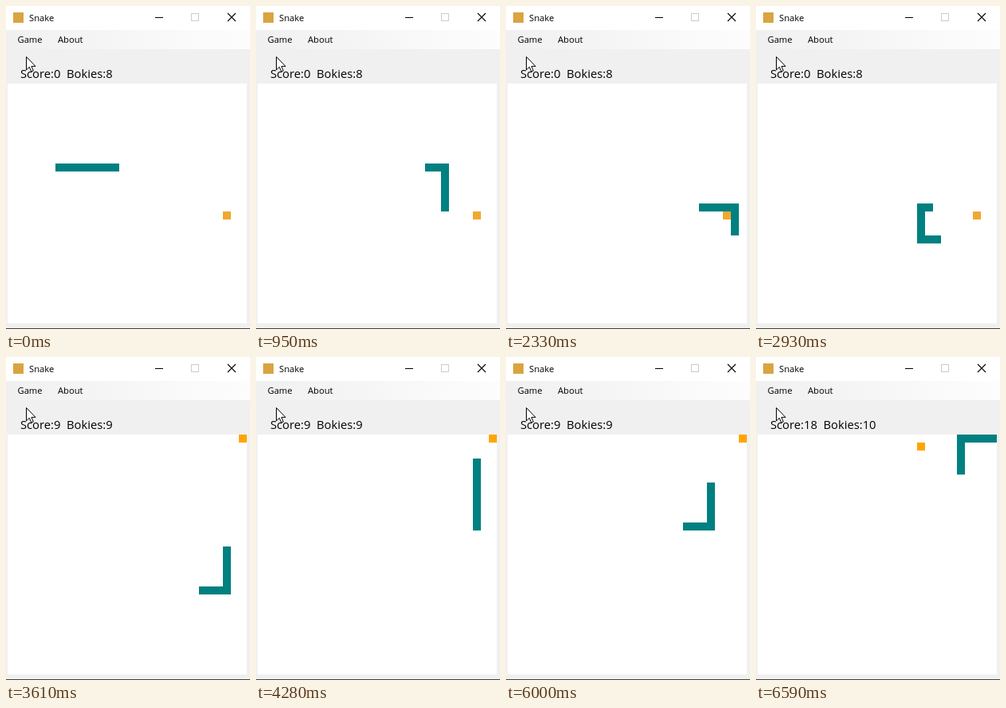
Write an HTML page that moves like this. It is 306 px wide and 404 px high and loops after 9.7 s.

```html
<!DOCTYPE html>
<html lang="en">
<head>
<meta charset="utf-8">
<title>Snake</title>
<style>
html, body { margin: 0; width: 100%; height: 100%; overflow: hidden; background: #f0f0f0; }
svg { display: block; font: 11.2px "Open Sans", sans-serif; }
</style>
</head>
<body>
<svg width="306" height="404" viewBox="0 0 306 404">
  <defs>
    <linearGradient id="strip">
      <stop offset="0" stop-color="#f0f0f0"/>
      <stop offset="1" stop-color="#fdfdfd"/>
    </linearGradient>
  </defs>

  <!-- title bar and menu -->
  <rect width="306" height="30" fill="#fff"/>
  <rect x="9" y="8" width="13" height="13" fill="#d9a441"/>
  <text x="29" y="19">Snake</text>
  <path d="M187 14.5h10" stroke="#000"/>
  <rect x="232.5" y="9.5" width="9" height="9" fill="none" stroke="#ccc"/>
  <path d="M278 9l10 10M288 9l-10 10" stroke="#000" stroke-width="1.1"/>
  <rect y="30" width="306" height="24" fill="url(#strip)"/>
  <text x="14.5" y="46">Game</text>
  <text x="65" y="46">About</text>

  <!-- board -->
  <text id="status" x="18" y="90" font-size="14.75"></text>
  <rect x="2" y="97" width="300" height="300" fill="#fff"/>
  <g transform="translate(2 97)" shape-rendering="crispEdges">
    <path id="food"/>
    <path id="snake" fill="#008080"/>
  </g>
  <rect y="403" width="306" height="1" fill="#404040"/>

  <path d="M25.5 63.5v16.4l3.8-3.6 2.5 5.8 2.5-1.1-2.4-5.6h5.1z" fill="#fff" stroke="#000"/>
</svg>
<script>
const LOOP = 9700, TICK = 63.37, START_LENGTH = 8;
const byId = id => document.getElementById(id);

// Screen refreshes: [first, last, count] in ms
const REFRESHES = [
  [70, 1020, 15], [1090, 2000, 14], [2070, 3000, 15], [3070, 4010, 15],
  [4080, 5030, 15], [5100, 6070, 14], [6140, 6590, 8]
].flatMap(([first, last, count]) => Array.from({ length: count }, (_, i) =>
  Math.floor((first + i * (last - first) / (count - 1)) / 10 + 1e-6) * 10));

// Route of the head, beginning at the first tail cell
const STEP = { R: [1, 0], L: [-1, 0], U: [0, -1], D: [0, 1] };
const route = [[6, 10]];
for (const [, dir, count] of "R17 D11 R5 U6 L8 D4 R7 U19 L5 D11 R3 U11 R4".matchAll(/(\w)(\d+)/g)) {
  for (let i = 0; i < count; i++) {
    const [x, y] = route.at(-1), [dx, dy] = STEP[dir];
    route.push([x + dx, y + dy]);
  }
}

const FOODS = [
  { cell: [27, 16], eatenAt: 54, color: "#f0a830" },
  { cell: [29, 0], eatenAt: 104, color: "#ffa500" },
  { cell: [20, 1], eatenAt: Infinity, color: "#ffa500" }
];

const square = ([x, y]) => `M${x * 10} ${y * 10}h10v10h-10z`;

function draw(time) {
  const shown = REFRESHES.findLast(r => r <= time) ?? 0;
  const moves = Math.floor(shown / TICK + 0.02);
  const eaten = FOODS.filter(f => f.eatenAt <= moves).length;
  // growth appears on the move after eating
  const length = START_LENGTH + FOODS.filter(f => f.eatenAt < moves).length;
  const head = moves + START_LENGTH;

  byId("snake").setAttribute("d", route.slice(head - length, head).map(square).join(""));
  byId("food").setAttribute("d", square(FOODS[eaten].cell));
  byId("food").setAttribute("fill", FOODS[eaten].color);
  byId("status").textContent = `Score:${eaten * 9}\u00a0\u00a0Bokies:${START_LENGTH + eaten}`;
}

const begin = performance.now();
function loop() {
  draw((performance.now() - begin) % LOOP);
  requestAnimationFrame(loop);
}
loop();
</script>
</body>
</html>
```
